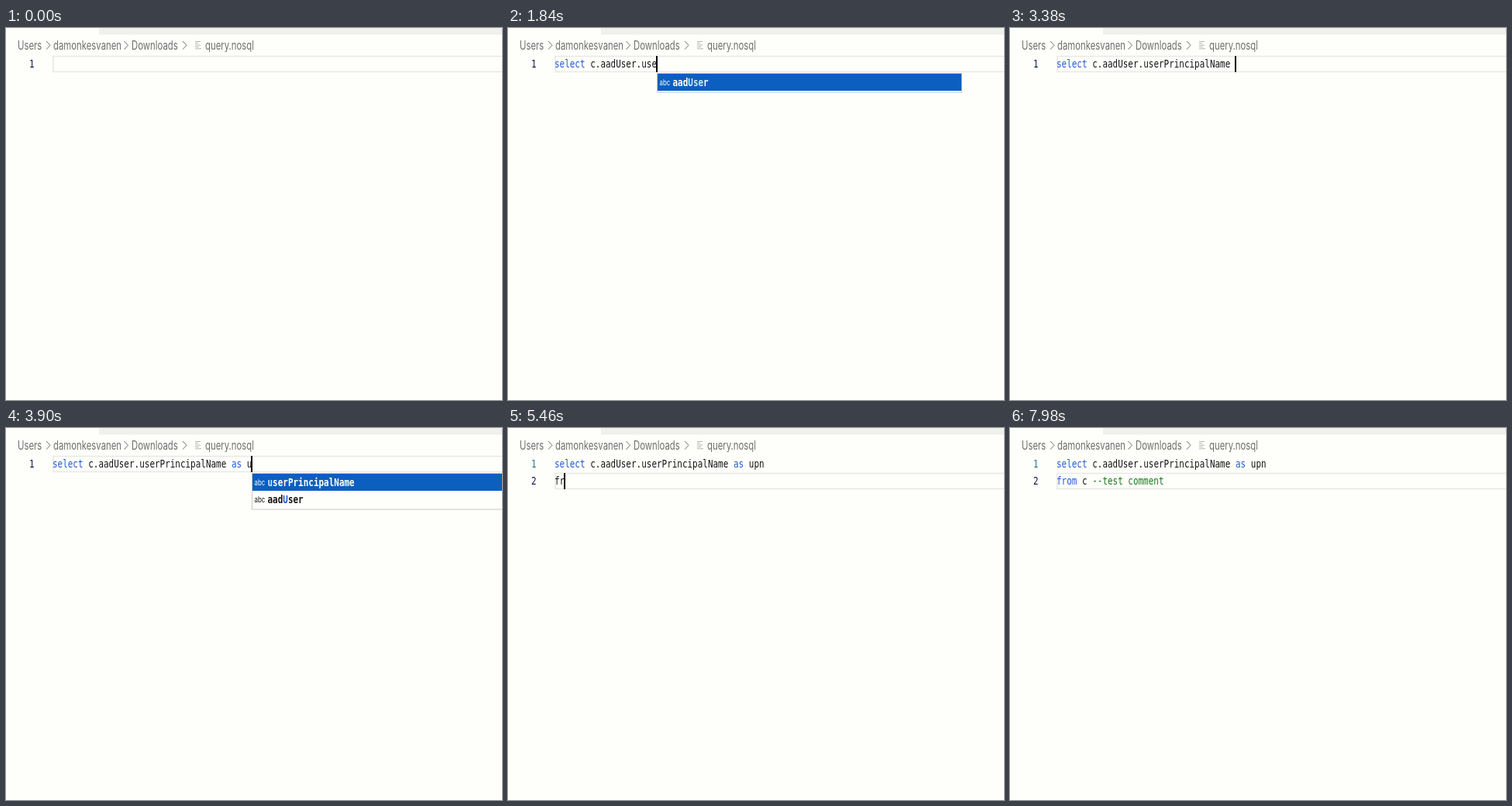
An HTML page with a canvas that plays this animation: 640 by 480 pixels, repeating every 8000 ms.

```html
<!DOCTYPE html>
<html lang="en">
<head>
<meta charset="utf-8">
<title>Query editor</title>
<style>
  html, body { margin: 0; width: 100%; height: 100%; overflow: hidden; background: #fefefb; }
  canvas { display: block; }
</style>
</head>
<body>
<canvas id="stage" width="640" height="480"></canvas>
<script>
const ctx = document.getElementById("stage").getContext("2d");

const LOOP = 8000;
const BLINK = 500;
const SQUEEZE = 0.747; // the whole screen is narrowed to 4:3
const CHAR = 6.6, LEFT = 60, TOP = 36, LINE = 22, BASE = 15;
const MONO = '14.67px "DejaVu Sans Mono", monospace';
const SANS = '15.2px Inter, sans-serif';
const ICON = '10.5px Inter, sans-serif';

const COLOR = {
  page: "#fefefb", tabs: "#f0f0ec", crumb: "#6e6e6c", mark: "#b4b4b0",
  lineBox: "#e8e8e8", text: "#151515", keyword: "#1f5cd0", comment: "#1a7a1a",
  number: "#237893", active: "#0b1a45", select: "#0a5fbf", frame: "#c8c8c8",
  light: "#ffffff", hit: "#c9ecff"
};

// [start ms, ms per key, keys]
const BURSTS = [
  [380, 74, "select c.aadUser.user"],
  [2400, 70, "PrincipalName "],
  [3500, 128, "as upn"],
  [5200, 125, "\nfrom c --"],
  [6680, 68, "test comment"]
];
const DISMISS = 4800;

function typedAt(t) {
  let text = "", last = -BLINK;
  for (const [start, step, keys] of BURSTS) {
    if (t < start) break;
    const n = Math.min(keys.length, Math.floor((t - start) / step) + 1);
    text += keys.slice(0, n);
    last = start + (n - 1) * step;
  }
  return { text, last };
}

function rect(x, y, w, h, color) {
  ctx.fillStyle = color;
  ctx.fillRect(x, y, w, h);
}

function write(str, x, y, font, color) {
  ctx.save();
  ctx.translate(x, y);
  ctx.scale(SQUEEZE, 1);
  ctx.font = font;
  ctx.fillStyle = color;
  ctx.fillText(str, 0, 0);
  ctx.restore();
}

function chevron(x) {
  ctx.strokeStyle = COLOR.crumb;
  ctx.lineWidth = 1;
  ctx.beginPath();
  ctx.moveTo(x, 17);
  ctx.lineTo(x + 5, 22.3);
  ctx.lineTo(x, 27.6);
  ctx.stroke();
}

function drawHeader() {
  rect(120, 0, 520, 8.5, COLOR.tabs);
  const crumbs = [["Users", 15], ["damonkesvanen", 61], ["Downloads", 162], ["query.nosql", 257]];
  for (const [name, x] of crumbs) write(name, x, 28, SANS, COLOR.crumb);
  [52, 152.5, 228].forEach(chevron);
  [7, 4, 7, 5, 8].forEach((w, i) => rect(244, 17 + i * 2.3, w, 1, COLOR.mark));
}

function drawCode(line, row) {
  const y = TOP + row * LINE + BASE;
  const parts = line.match(/--.*|\w+|\s+|[^\w\s]/g) || [];
  let col = 0;
  for (const part of parts) {
    const color = part.startsWith("--") ? COLOR.comment
      : /^(select|as|from)$/.test(part) ? COLOR.keyword : COLOR.text;
    write(part, LEFT + col * CHAR, y, MONO, color);
    col += part.length;
  }
}

// Letters of a known word that match the typed one, or null
function matchHits(word, typed) {
  const starts = [...word].map((c, i) => i === 0 || /[A-Z]/.test(c));
  const hits = [];
  let from = 0;
  for (const key of typed.toLowerCase()) {
    let i = from;
    while (i < word.length &&
      (word[i].toLowerCase() !== key || (!hits.length && !starts[i]))) i++;
    if (i === word.length) return null;
    hits.push(i);
    from = i + 1;
  }
  return hits;
}

function suggestions(text) {
  const typed = (text.match(/\w+$/) || [""])[0];
  if (!typed || text.includes("--")) return [];
  const known = new Set(text.slice(0, -typed.length).match(/\w+/g) || []);
  known.delete(typed);
  return [...known]
    .map(word => ({ word, hits: matchHits(word, typed) }))
    .filter(item => item.hits)
    .sort((a, b) => a.hits[0] - b.hits[0]);
}

function drawPopup(items, caretX) {
  const x = Math.round(caretX) + 0.5, y = 58, w = 393;
  const h = items.length * LINE + 3;
  rect(x, y, w, h, COLOR.page);
  ctx.strokeStyle = COLOR.frame;
  ctx.lineWidth = 1;
  ctx.strokeRect(x, y + 0.5, w, h - 0.5);
  rect(x + 0.5, y + 1, w - 1, LINE, COLOR.select);
  items.forEach(({ word, hits }, i) => {
    const base = y + 16.5 + i * LINE;
    const plain = i ? COLOR.text : COLOR.light;
    const strong = i ? COLOR.keyword : COLOR.hit;
    write("abc", x + 3, base - 1, ICON, plain);
    [...word].forEach((c, k) =>
      write(c, x + 20 + k * CHAR, base, "bold " + MONO, hits.includes(k) ? strong : plain));
  });
}

function draw(t) {
  const { text, last } = typedAt(t);
  const lines = text.split("\n");
  const row = lines.length - 1;
  const caretX = LEFT + lines[row].length * CHAR;
  const rowY = TOP + row * LINE;

  rect(0, 0, 640, 480, COLOR.page);
  drawHeader();
  ctx.strokeStyle = COLOR.lineBox;
  ctx.lineWidth = 1.6;
  ctx.strokeRect(61, rowY + 0.5, 600, 20);

  lines.forEach((line, i) => {
    write(String(i + 1), 30, TOP + i * LINE + BASE, MONO, i === row ? COLOR.active : COLOR.number);
    drawCode(line, i);
  });

  if ((t - last) % (2 * BLINK) < BLINK) rect(Math.round(caretX) - 1, rowY, 2, 21, "#000");

  const items = t < DISMISS ? suggestions(text) : [];
  if (items.length) drawPopup(items, caretX);
}

const begin = performance.now();
function tick() {
  draw((performance.now() - begin) % LOOP);
  requestAnimationFrame(tick);
}
tick();
</script>
</body>
</html>
```
